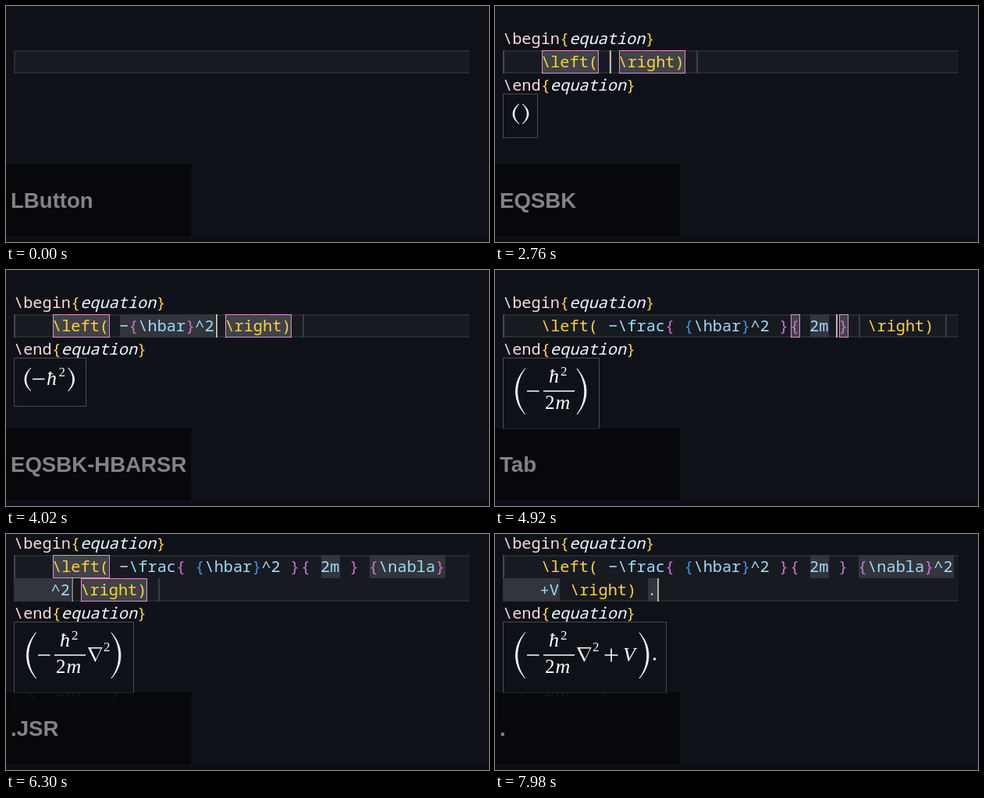
Recreate the animation shown at these times as an HTML page. Size 619 by 304 pixels, loop 8 s.

```html
<!DOCTYPE html>
<html lang="en">
<head>
<meta charset="utf-8">
<title>Typing an equation</title>
<style>
  html, body { margin: 0; width: 100%; height: 100%; overflow: hidden; background: #0e1118; }
  svg { display: block; }
  text { white-space: pre; }
  .code { font: 20.28px "Noto Sans Mono", monospace; }
  .math { font-family: "Liberation Serif", serif; fill: #fff; }
  .it { font-style: italic; }
  .key { font: bold 27.6px "Liberation Sans", sans-serif; fill: #838385; }
</style>
</head>
<body>
<svg id="stage" width="619" height="304" viewBox="0 0 619 304"></svg>
<script>
const LOOP = 8000;
const CW = 12.168;   // width of one code character
const LH = 30;       // line height
const GOLD = '#ffd23c', PINK = '#fbdcda', PALE = '#f3fbfa', BLUE = '#9edcfe';
const DEPTH = ['#cb74cf', '#3f93e0'];
const stage = document.getElementById('stage');

// --- editor contents: segments are [x, text, mark, row]; mark p = placeholder, b = bracket pair
const right = (x, mark, row = 0) => [[x, '\\right)', mark, row], [x + 99, '', 'p', row]];

function paren(inner) {
  const braces = (inner.match(/[{}]/g) || []).length;
  const r = 146 + inner.length * CW + 12.5 + braces * 0.6;
  return { segs: [[60, '\\left(', 'b'], [146, inner, 'p'], ...right(r, 'b')], cur: r - 12 };
}

const numerator = mark => [[60, '\\left(', mark], [146, '-\\frac{ {\\hbar}^2 }']];
const fraction = mark => [...numerator(mark), [379, '{'], [404, '2m', 'p'], [441, '}']];

function denominator(den) {
  const end = 404 + den.length * CW;
  return {
    segs: [...numerator(), [379, '{', 'b'], [404, den, 'p'], [end + 13, '}', 'b'],
      [end + 38, '', 'p'], ...right(end + 50)],
    cur: end
  };
}

function after(text) {
  const w = text.length * CW;
  return { segs: [...fraction('b'), [466, text, 'p'], ...right(479 + w, 'b')], cur: 466 + w };
}

function wrap(first, second) {
  const r = 59 + (second ? second.length * CW + 13 : 0);
  const lead = second ? [[10, '    ', 'p', 1], [58.5, second, 'p', 1]] : [];
  return {
    segs: [...fraction('b'), [466, first, 'p'], ...lead, ...right(r, 'b', 1)],
    rows: 2, dim: 1,
    cur: second ? r - 12 : 466 + first.length * CW,
    curRow: second ? 1 : 0
  };
}

function leave(text) {
  return {
    segs: [...fraction(), [466, '{\\nabla}^2', 'p'], [10, '    ', 'p', 1], [58.5, '+V', 'p', 1],
      [97, '\\right)', '', 1], [196, text, 'p', 1]],
    cur: 196 + text.length * CW, curRow: 1
  };
}

// --- timeline: each step overrides part of the state
const NABLA = '{\\nabla}', HBAR = '-{\\hbar}', K = 'EQSBK-HBAR';
const steps = [
  [0, { key: 'LButton', segs: [], cur: null, curRow: 0, dim: 1, rows: 1, top: 57, doc: false, math: null }],
  [540, { cur: 10 }],
  [1140, { dim: 0.65 }], [1200, { dim: 0.3 }], [1260, { dim: 0 }],
  [1560, { segs: [[11, 'e']], cur: 23, dim: 1, key: 'E' }],
  [1740, { segs: [[11, 'eq']], cur: 35, key: 'EQ' }],
  [1800, { segs: [], doc: true, cur: 60 }],
  [1980, { math: '' }],
  [2340, { segs: [[60, 's']], cur: 72, key: 'EQS' }], [2400, { math: 's' }],
  [2580, { segs: [[60, 'sb']], cur: 84, key: 'EQSB' }], [2640, { math: 'sb' }],
  [2700, { ...paren(''), key: 'EQSBK' }], [2760, { math: '(' }],
  [2940, { ...paren('-'), key: 'EQSBK-' }], [3000, { math: '(-' }],
  [3180, { ...paren('-h'), key: 'EQSBK-H' }], [3240, { math: '(-h' }],
  [3360, { ...paren('-hb'), key: 'EQSBK-HB' }], [3420, { math: '(-hb' }],
  [3480, { ...paren('-hba'), key: 'EQSBK-HBA' }], [3540, { math: '(-hba' }],
  [3660, { ...paren(HBAR), key: K }], [3720, { math: '(-ħ' }],
  [3840, { ...paren(HBAR + 's'), key: K + 'S' }], [3900, { math: '(-ħs' }],
  [3960, { ...paren(HBAR + '^2'), key: K + 'SR' }], [4020, { math: '(-ħ2' }],
  [4140, { ...denominator(''), key: K + 'SR/' }], [4200, { math: '/' }],
  [4380, { ...denominator('2'), key: K + 'SR/2' }],
  [4440, { ...denominator('2m'), key: K + 'SR/2M' }], [4560, { math: '/2m' }],
  [4920, { cur: 437, key: 'Tab' }], [4980, after('')],
  [5160, { ...after('.'), key: '.' }], [5220, { math: '/2m/.' }],
  [5280, { ...wrap(NABLA, ''), key: '.J' }], [5400, { math: '/2m/∇' }],
  [5520, { ...wrap(NABLA + 's', ''), key: '.JS' }], [5580, { math: '/2m/∇s' }],
  [5640, { ...wrap(NABLA, '^2'), key: '.JSR' }], [5700, { math: '/2m/∇2' }],
  [5760, { top: 27, ghost: '/2m/∇2' }],
  [6300, { dim: 0.65 }], [6360, { dim: 0.3 }], [6420, { dim: 0 }],
  [6600, { ...wrap(NABLA + '^2', '+'), key: '+' }], [6840, { math: '/2m/∇2+' }],
  [7080, { ...wrap(NABLA + '^2', '+V'), key: '+V' }], [7260, { math: '/2m/∇2+V' }],
  [7440, { cur: 110, key: 'Tab' }], [7500, leave('')],
  [7860, { ...leave('.'), key: '.' }], [7980, { math: '/2m/∇2+V.' }]
];
let merged = {};
const states = steps.map(([t, change]) => [t, merged = { ...merged, ...change }]);

// --- drawing helpers
const rect = (x, y, w, h, fill, extra = '') =>
  `<rect x="${Math.round(x)}" y="${y}" width="${Math.round(w)}" height="${h}" fill="${fill}" ${extra}/>`;
const frame = (x, y, w, h, fill, stroke) =>
  rect(x, y, w, h, stroke) + rect(x + 1, y + 1, w - 2, h - 2, fill);
const span = (text, fill, cls = '') => `<tspan fill="${fill}" class="${cls}">${text}</tspan>`;
const code = (x, y, inner) => `<text class="code" x="${x - 1}" y="${y}">${inner}</text>`;
const glyph = (x, y, ch, size = 26) =>
  `<text class="math ${/[a-zħV]/.test(ch) ? 'it' : ''}" x="${x}" y="${y}" font-size="${size}">${ch}</text>`;
const stroke = (d, w = 1.6) => `<path d="${d}" fill="none" stroke="#fff" stroke-width="${w}"/>`;
const nabla = (x, y) =>
  `<path fill="#fff" fill-rule="evenodd" d="M${x},${y}h18.5l-9.2,19zm3.6,1.6l6.6,13.6l6.6,-13.6z"/>`;

function curve(x, y, w, h, thick, dir) {
  const tip = dir < 0 ? x + w : x;
  const side = w * 1.333 * dir, inner = side - thick * 1.333 * dir;
  const a = y + h * 0.3, b = y + h * 0.7;
  return `<path fill="#fff" stroke="#fff" stroke-width=".8" d="M${tip},${y}` +
    `C${tip + side},${a} ${tip + side},${b} ${tip},${y + h}` +
    `C${tip + inner},${b} ${tip + inner},${a} ${tip},${y}Z"/>`;
}

function colored(text, nest) {
  return (text.match(/\\left\(|\\right\)|\\[a-z]+|[{}]|[^\\{}]+/g) || []).map(tok => {
    if (/^\\(left|right)/.test(tok)) return span(tok, GOLD);
    if (tok === '{') return span(tok, DEPTH[nest.n++]);
    if (tok === '}') return span(tok, DEPTH[--nest.n]);
    return span(tok.replace('-', '−'), BLUE);
  }).join('');
}

const tag = (name, y) => code(11, y,
  span(name, PINK) + span('{', GOLD) + span('equation', PALE, 'it') + span('}', GOLD));

// --- formula preview
const ADV = { h: 13.5, ħ: 13.5, b: 10.5, a: 12.5, s: 11.5, 2: 12 };

function flatMath(m, y) {
  const fenced = m[0] === '(', tall = m.includes('2');
  const o = tall ? 1 : 0, base = y + (tall ? 35 : 31);
  let x = fenced ? 33 + o : 23, out = '';
  for (const ch of fenced ? m.slice(1) : m) {
    if (ch === '-') {
      out += stroke(`M${x},${base - 7.5}h15.5`);
      x += 18;
    } else {
      out += ch === '2' ? glyph(x + 2, base - 11, ch, 17) : glyph(x, base, ch);
      x += ADV[ch];
    }
  }
  if (!fenced) return { out, right: m ? x + 12 : 36, h: 57 };
  const h = tall ? 30 : 26;
  out += curve(23 + o, y + 13, 8, h, 1.8, -1) + curve(x + 2, y + 13, 8, h, 1.8, 1);
  return { out, right: x + (tall ? 25 : 22), h: tall ? 63 : 57 };
}

const TAIL_END = { '': 3, '.': 10, '∇': 22, '∇s': 31, '∇2': 33, '∇2+': 58, '∇2+V': 83 };

function fracMath(m, y) {
  const [, den, rest = ''] = m.split('/');
  const dotEnd = rest.endsWith('V.');
  const tail = dotEnd ? rest.slice(0, -1) : rest;
  const end = den.length > 1 ? 102 : 88, mid = (62 + end) / 2;
  const axis = y + 43, base = y + 51;
  const close = end + TAIL_END[tail];
  let out = curve(26.5, y + 14, 12, 59, 2.2, -1) + curve(close, y + 14, 12, 59, 2.2, 1) +
    stroke(`M41,${axis}h15.5M62,${axis}H${end}`) +
    glyph(mid - 13, y + 32, 'ħ') + glyph(mid + 2, y + 23, '2', 17);
  if (den) out += glyph(den === '2' ? mid - 6 : mid - 18, y + 66, '2', 25);
  if (den === '2m') out += glyph(mid - 4.5, y + 66, 'm');
  for (const ch of tail) {
    if (ch === '∇') out += nabla(end + 3, y + 33);
    if (ch === '2') out += glyph(end + 23, y + 38, ch, 17);
    if (ch === '+') out += stroke(`M${end + 38.5},${axis}h17m-8.5,-8.5v17`);
    if (ch === 's') out += glyph(end + 22, base, ch);
    if (ch === 'V') out += glyph(end + 62, base, ch);
    if (ch === '.') out += glyph(end + 3, base, ch);
  }
  if (dotEnd) out += `<circle cx="${close + 19.5}" cy="${base - 3}" r="1.7" fill="#fff"/>`;
  return { out, right: close + (dotEnd ? 35 : 29), h: 92 };
}

function preview(m, y) {
  const { out, right, h } = m[0] === '/' ? fracMath(m, y) : flatMath(m, y);
  return frame(10, y, right - 10, h, '#0e1118', '#484b50') + out;
}

function draw(s) {
  const { top, rows } = s, height = rows * LH;
  let out = rect(0, 0, 619, 304, '#0e1118') + rect(0, 299, 619, 5, '#0b0c15') +
    rect(10, top, 584, height, '#171a21') +
    rect(10, top, 584, 2, '#282b2b') + rect(10, top + height - 2, 584, 2, '#282b2b') +
    rect(10, top, 2, height, '#282b2b');
  if (s.doc && s.segs.length) out += rect(10, top, 2, height, '#44474b');

  const nest = { n: 0 };
  let words = '';
  for (const [x, text, mark, row = 0] of s.segs) {
    const y = top + row * LH, w = text.length * CW;
    if (mark === 'p') out += rect(x, y, w || 2, LH, text ? '#32353b' : '#3a3d42');
    if (mark === 'b') out += frame(x, y, w, LH, '#404347', '#e08fd8');
    words += code(x, y + 22, colored(text, nest));
  }
  out += words;
  if (s.doc) out += tag('\\begin', top - 8) + tag('\\end', top + height + 22);
  if (s.cur !== null)
    out += rect(s.cur, top + s.curRow * LH, 2, LH, '#b9b4aa', `opacity="${s.dim}"`);
  const mathTop = top + height + 26;
  if (s.ghost) out += `<g opacity=".1">${preview(s.ghost, mathTop + LH)}</g>`;
  if (s.math !== null) out += preview(s.math, mathTop);

  out += rect(0, 204, 237, 93, '#000', 'opacity=".5"') +
    `<svg width="237" height="304"><text class="key" x="6" y="260">${s.key}</text></svg>`;
  stage.innerHTML = out;
}

let shown = -1;
function tick() {
  const t = performance.now() % LOOP;
  let i = states.length - 1;
  while (states[i][0] > t) i--;
  if (i !== shown) draw(states[shown = i][1]);
  requestAnimationFrame(tick);
}
tick();
</script>
</body>
</html>
```
